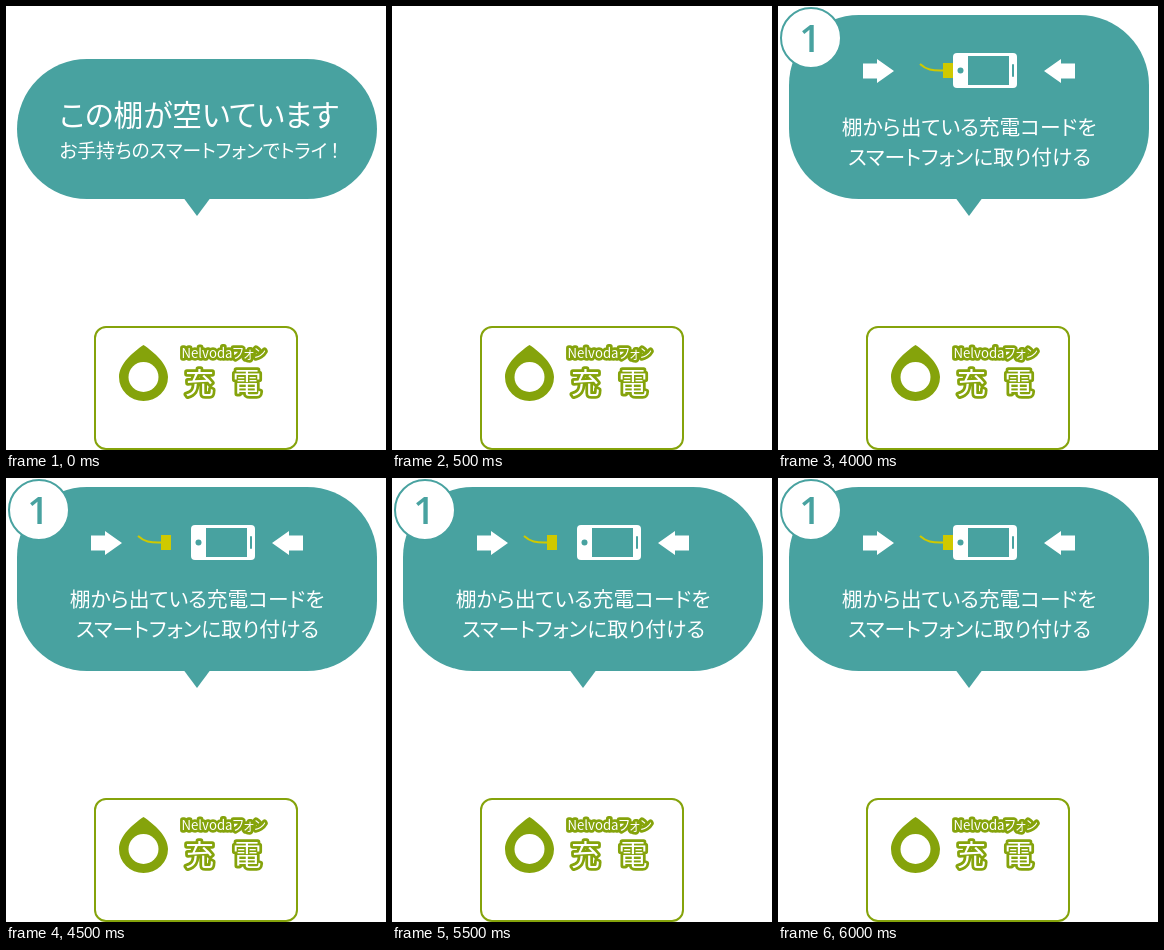
An HTML page for the animation above (8000 ms loop, 380 by 444 pixels).

```html
<!DOCTYPE html>
<html lang="ja">
<head>
<meta charset="utf-8">
<title>充電の手順</title>
<style>
  html, body { margin: 0; width: 100%; height: 100%; overflow: hidden; background: #fff; }
  svg { display: block; width: 380px; height: 444px; --teal: #48a2a0; --green: #85a30b; --cord: #cfc900; }
  text {
    font-family: "Noto Sans CJK JP", "Noto Sans CJK", sans-serif;
    font-feature-settings: "palt";
    text-anchor: middle;
    fill: #fff;
  }
  .teal { fill: var(--teal); }
  .white { fill: #fff; }
  .outlined { stroke: var(--green); stroke-width: 5.5; stroke-linejoin: round; paint-order: stroke; font-weight: 500; }
  .step-number { font: 600 38px "Open Sans", sans-serif; fill: var(--teal); }
</style>
</head>
<body>
<svg viewBox="0 0 380 444">
  <defs>
    <path id="tail" d="M178 192.5H204L191 210Z"/>
    <path id="arrow" d="M85 57.5H99V53L116 65L99 77V72.5H85Z"/>
  </defs>

  <g id="intro">
    <rect class="teal" x="11" y="53" width="360" height="140" rx="70"/>
    <use href="#tail" class="teal"/>
    <text x="193" y="119.5" font-size="29.7">この棚が空いています</text>
    <text x="193.5" y="152" font-size="18.8">お手持ちのスマートフォンでトライ<tspan dx="3">！</tspan></text>
  </g>

  <g id="step">
    <rect class="teal" x="11" y="9" width="360" height="184" rx="70"/>
    <use href="#tail" class="teal"/>
    <circle cx="33" cy="32" r="30" fill="#fff" stroke="var(--teal)" stroke-width="2"/>
    <text class="step-number" x="32" y="46">1</text>
    <use href="#arrow" class="white"/>
    <use href="#arrow" class="white" transform="translate(382 0) scale(-1 1)"/>
    <g id="plug">
      <path d="M132 58C138 63.5 144 65 156 64.5" fill="none" stroke="var(--cord)" stroke-width="2"/>
      <rect x="155" y="57" width="10" height="15" fill="var(--cord)"/>
    </g>
    <g id="phone">
      <rect class="white" x="185" y="47" width="64" height="35" rx="4"/>
      <rect class="teal" x="200" y="50" width="41" height="29"/>
      <circle class="teal" cx="192.5" cy="64.5" r="3"/>
      <rect class="teal" x="244" y="58" width="2" height="13" rx="1"/>
    </g>
    <text x="191" y="129" font-size="20.8">棚から出ている充電コードを</text>
    <text x="191.5" y="159" font-size="20.8">スマートフォンに取り付ける</text>
  </g>

  <g id="shelf">
    <rect x="89" y="321" width="202" height="122" rx="11" fill="#fff" stroke="var(--green)" stroke-width="2"/>
    <path d="M137.5 339C148 346 162 358 162 371A24.5 24 0 0 1 113 371C113 358 127 346 137.5 339Z" fill="var(--green)"/>
    <circle class="white" cx="137.5" cy="371" r="15"/>
    <g class="outlined">
      <text x="217.5" y="352" font-size="13.2">Nelvodaフォン</text>
      <text x="193.5" y="388" font-size="29">充</text>
      <text x="241" y="388" font-size="29">電</text>
    </g>
  </g>
</svg>
<script>
  const LOOP = 8000, INTRO_END = 500, STEP_START = 3500, BLINK = 500, PLUGGED_AT = 6000;
  const byId = id => document.getElementById(id);
  const [intro, step, plug, phone] = ["intro", "step", "plug", "phone"].map(byId);
  const show = (node, visible) => node.setAttribute("visibility", visible ? "visible" : "hidden");
  const shift = (node, dx) => node.setAttribute("transform", `translate(${dx} 0)`);
  const start = performance.now();

  function draw(now) {
    const t = Math.max(0, now - start) % LOOP;
    const joined = t >= PLUGGED_AT || Math.floor((t - STEP_START) / BLINK) % 2 === 1;
    show(intro, t < INTRO_END);
    show(step, t >= STEP_START);
    shift(plug, joined ? 10 : 0);
    shift(phone, joined ? -10 : 0);
    requestAnimationFrame(draw);
  }
  draw(start);
</script>
</body>
</html>
```
